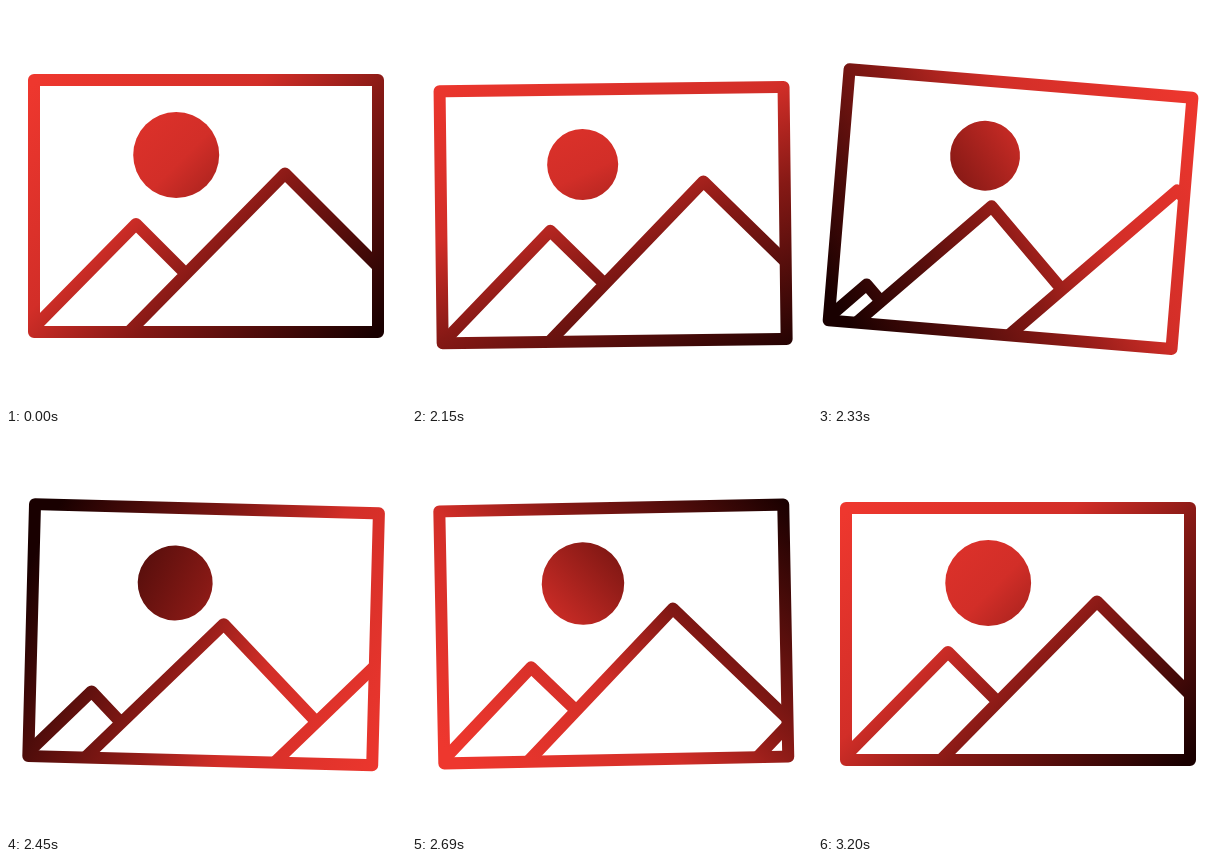
Recreate the animation shown at these times as an HTML page with a canvas. Size 400x400 px, loop 3.23 s.

```html
<!DOCTYPE html>
<html>
<head>
<meta charset="utf-8">
<style>
html, body { margin: 0; width: 100%; height: 100%; overflow: hidden; background: #fff; }
canvas { display: block; width: 400px; height: 400px; }
</style>
</head>
<body>
<canvas id="stage"></canvas>
<script>
const LOOP = 3230, START = 2000, STEP = 30, STEPS = 40;
const LEFT = 28, TOP = 74, RIGHT = 372, BOTTOM = 326;
const PIVOT = { x: 200, y: 110 };
const SLOPE = 0.985;

// Peaks travel from each stop to the next
const stops = [[28, 323], [130, 218], [279, 167.5], [530, 167.5]];
// Turning points of the swinging frame: [step, degrees]
const swings = [[0, 0], [3, -2.1], [10, 4.95], [20, -1.9], [29, 1.05], [38, 0]];
const colors = [[0, '#ee372e'], [.38, '#d22e28'], [.6, '#861915'], [1, '#190000']];

const canvas = document.getElementById('stage');
const ctx = canvas.getContext('2d');
const dpr = window.devicePixelRatio || 1;
canvas.width = canvas.height = 400 * dpr;

const rad = deg => deg * Math.PI / 180;
const mix = (a, b, f) => a + (b - a) * f;
const smooth = s => s * s * (3 - 2 * s);

// Cubic bezier easing with control points (x1, 0) and (x2, 1)
function ease(x1, x2) {
  return x => {
    let lo = 0, hi = 1;
    for (let i = 0; i < 24; i++) {
      const s = (lo + hi) / 2, r = 1 - s;
      if (3 * s * r * r * x1 + 3 * s * s * r * x2 + s * s * s < x) lo = s;
      else hi = s;
    }
    return smooth(lo);
  };
}
const travel = ease(.39, .16);
const turn = ease(.3, .45);

// Quick pulse that reaches 1 at the given step and dies away
function pulse(k, peak, power) {
  const x = k / peak;
  return (x * Math.exp(1 - x)) ** power;
}

function tilt(k) {
  const i = swings.findIndex(([step]) => step > k);
  if (i < 0) return 0;
  const [k0, a] = swings[i - 1], [k1, b] = swings[i];
  return mix(a, b, smooth((k - k0) / (k1 - k0)));
}

function paint(turned) {
  const a = rad(45 + 360 * turned);
  const cx = 200 + 25 * Math.sin(Math.PI * turned) ** 2, cy = 200;
  const dx = 209 * Math.cos(a), dy = 209 * Math.sin(a);
  const g = ctx.createLinearGradient(cx - dx, cy - dy, cx + dx, cy + dy);
  colors.forEach(c => g.addColorStop(...c));
  return g;
}

function mountains(p) {
  const rise = p + .045 * Math.sin(2 * Math.PI * p);
  const peaks = stops.slice(1).map(([x, y], i) => [mix(stops[i][0], x, p), mix(stops[i][1], y, i ? rise : p)]);
  ctx.save();
  ctx.beginPath();
  ctx.rect(LEFT, TOP, RIGHT - LEFT, BOTTOM - TOP);
  ctx.clip();
  ctx.beginPath();
  peaks.forEach(([x, y], i) => {
    // The right slope stops where the next mountain begins
    const [nx, ny] = peaks[i + 1] || [RIGHT + 200, y];
    const leg = (nx - x - SLOPE * (y - ny)) / (1 + SLOPE);
    ctx.moveTo(x - SLOPE * (BOTTOM - y), BOTTOM);
    ctx.lineTo(x, y);
    if (leg > 0) ctx.lineTo(x + leg, y + leg);
  });
  ctx.stroke();
  ctx.restore();
}

function draw(k) {
  const time = k / STEPS;
  ctx.setTransform(dpr, 0, 0, dpr, 0, 0);
  ctx.fillStyle = '#fff';
  ctx.fillRect(0, 0, 400, 400);

  ctx.translate(PIVOT.x, PIVOT.y + 9.5 * pulse(k, 5.8, 4));
  ctx.rotate(rad(tilt(k)));
  ctx.translate(-PIVOT.x, -PIVOT.y);

  ctx.fillStyle = ctx.strokeStyle = paint(turn(time));
  ctx.lineWidth = 12;
  ctx.lineJoin = ctx.lineCap = 'round';

  mountains(k < STEPS ? travel(time) : 0);
  ctx.strokeRect(LEFT, TOP, RIGHT - LEFT, BOTTOM - TOP);
  ctx.beginPath();
  ctx.arc(170.2, 149, 43 * (1 - .21 * pulse(k, 8, 2)), 0, 2 * Math.PI);
  ctx.fill();
}

const origin = performance.now();
function tick() {
  const t = (performance.now() - origin) % LOOP;
  draw(Math.min(STEPS, Math.max(0, Math.floor((t - START) / STEP))));
  requestAnimationFrame(tick);
}
tick();
</script>
</body>
</html>
```
